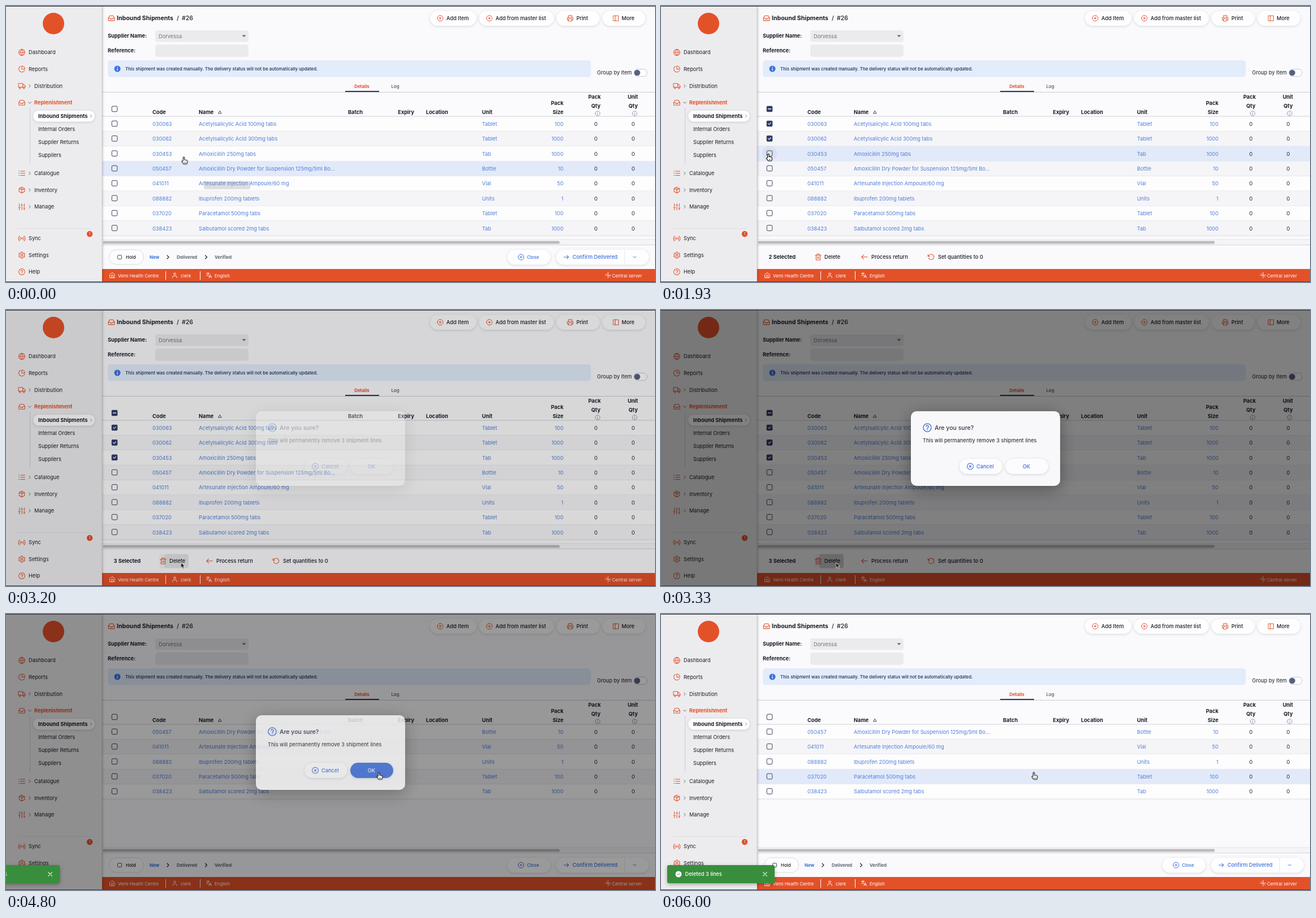
An HTML page that plays this animation: 1148 px wide and 488 px high, repeating every 6070 ms.

```html
<!DOCTYPE html>
<html lang="en">
<head>
<meta charset="utf-8">
<title>Inbound shipment</title>
<style>
  html, body { margin: 0; width: 100%; height: 100%; overflow: hidden; background: #fafafc; }
  svg { display: block; width: 100vw; height: 100vh; font-family: Inter, Roboto, sans-serif; }
  text { white-space: pre; }
  .raised { filter: drop-shadow(0 1px 2px rgba(40, 45, 70, .18)); }
  .card { filter: drop-shadow(0 6px 14px rgba(0, 0, 0, .35)); }
  .toast { filter: drop-shadow(0 2px 3px rgba(0, 0, 0, .3)); }
</style>
</head>
<body>
<svg id="stage" viewBox="0 0 1148 488" preserveAspectRatio="none"></svg>
<script>
const LOOP = 6070;
const CHECKED = [1070, 1500, 2070];
const GONE = 4700;
const ORANGE = '#e35129', INK = '#1c1c28', BLUE = '#3e70dc', LINK = '#527fd6', NAVY = '#323c66', GREY = '#606478';

const ICONS = {
  globe: 'M2 12a10 10 0 1 0 20 0a10 10 0 1 0-20 0h20M12 2c5.4 6 5.4 14 0 20c-5.4-6-5.4-14 0-20',
  pie: 'M21.2 15.9A10 10 0 1 1 8 2.8M22 12A10 10 0 0 0 12 2v10z',
  truck: 'M1 4h14v12H1zM15 8h4l4 4v4h-8M3.5 18.5a2.5 2.5 0 1 0 5 0a2.5 2.5 0 1 0-5 0M16 18.5a2.5 2.5 0 1 0 5 0a2.5 2.5 0 1 0-5 0',
  inbox: 'M22 12h-6l-2 3h-4l-2-3H2M5.5 5L2 12v6a2 2 0 0 0 2 2h16a2 2 0 0 0 2-2v-6l-3.5-7a2 2 0 0 0-1.7-1H7.2a2 2 0 0 0-1.7 1z',
  list: 'M8 5h14M8 12h14M8 19h14M2 5h2M2 12h2M2 19h2',
  box: 'M21 7l-9-5-9 5v10l9 5 9-5zM3 7l9 5 9-5M12 22V12M7.500 4.500l9 5',
  sliders: 'M4 22v-8M4 10V2M12 22V12M12 8V2M20 22v-6M20 12V2M1 14h6M9 8h6M17 16h6',
  radio: 'M16.200 7.800a6 6 0 0 1 0 8.500M7.800 16.200a6 6 0 0 1 0-8.500M19.500 4a11 11 0 0 1 0 16M4.500 20a11 11 0 0 1 0-16M10.500 12a1.500 1.500 0 1 0 3 0a1.500 1.500 0 1 0-3 0',
  gear: 'M9 12a3 3 0 1 0 6 0a3 3 0 1 0-6 0M10 2h4l.6 3 2.400 1.400 3-1 2 3.400-2.300 2v2.400l2.300 2-2 3.400-3-1L14.600 19l-.6 3h-4l-.6-3L7 17.600l-3 1-2-3.400 2.300-2v-2.400L2 8.800l2-3.400 3 1L9.400 5z',
  help: 'M2 12a10 10 0 1 0 20 0a10 10 0 1 0-20 0M9 9a3 3 0 0 1 6 1c0 2-3 2.500-3 4.500M12 17v.5',
  info: 'M2 12a10 10 0 1 0 20 0a10 10 0 1 0-20 0M12 11v6M12 7v.5',
  plus: 'M2 12a10 10 0 1 0 20 0a10 10 0 1 0-20 0M12 8v8M8 12h8',
  cancel: 'M2 12a10 10 0 1 0 20 0a10 10 0 1 0-20 0M9 9l6 6M15 9l-6 6',
  printer: 'M6 9V2h12v7M6 18H2V9h20v9h-4M6 14h12v8H6z',
  panel: 'M3 3h18v18H3zM9 3v18',
  trash: 'M2 6h20M19 6v16H5V6M8 6V2h8v4M10 11v6M14 11v6',
  undo: 'M1 4v6h6M3.500 15a9 9 0 1 0 2-9.400L1 10',
  left: 'M22 12H2M9 5l-7 7 7 7',
  rightArrow: 'M2 12h20M15 5l7 7-7 7',
  home: 'M3 9l9-7 9 7v13H3zM9 22V12h6v10',
  user: 'M20 22v-3a4 4 0 0 0-4-4H8a4 4 0 0 0-4 4v3M8 7a4 4 0 1 0 8 0a4 4 0 1 0-8 0',
  translate: 'M2 5h12M8 2v3M11 5c-1 5-5 8-9 10M5 9c2 3 4 5 7 6M12 22l5-12 5 12M14 18h6',
  hub: 'M12 1v7M12 16v7M1 12h7M16 12h7M5 5l3 3M16 16l3 3M12 10v4M10 12h4',
  right: 'M8 4l8 8-8 8',
  down: 'M4 8l8 8 8-8',
  check: 'M4 12l6 6L20 6',
  close: 'M4 4l16 16M20 4L4 20'
};

const icon = (name, x, y, size, color, weight = 2) =>
  `<path d="${ICONS[name]}" transform="translate(${x - size / 2} ${y - size / 2}) scale(${size / 24})" fill="none" stroke="${color}" stroke-width="${weight}" stroke-linecap="round" stroke-linejoin="round"/>`;
// Text is placed by its vertical centre.
const text = (x, y, str, { color = INK, size = 9.23, weight = 400, anchor = 'start' } = {}) =>
  `<text x="${x}" y="${y + size * .36}" fill="${color}" font-size="${size}" font-weight="${weight}" text-anchor="${anchor}">${str}</text>`;
const rect = (x, y, w, h, fill, extra = '') =>
  `<rect x="${x}" y="${y}" width="${w}" height="${h}" fill="${fill}" ${extra}/>`;
const circle = (x, y, r, fill, extra = '') => `<circle cx="${x}" cy="${y}" r="${r}" fill="${fill}" ${extra}/>`;
const pill = (x, y, w, h, fill = '#fefeff') => rect(x, y, w, h, fill, `rx="${h / 2}" class="raised"`);
// "on" lists the time spans in ms during which the content is visible.
const during = (on, content) => `<g data-on="${on}">${content}</g>`;

const emptyBox = (x, y, size = 9.6) =>
  rect(x - size / 2, y - size / 2, size, size, 'none', 'rx="1.8" stroke="#3f4358" stroke-width="1"');
const fullBox = (x, y, mark) =>
  rect(x - 5.3, y - 5.3, 10.6, 10.6, NAVY, 'rx="1.8"') + icon(mark, x, y, 7, '#fff', 3.5);
const minusBox = (x, y) => rect(x - 5.3, y - 5.3, 10.6, 10.6, NAVY, 'rx="1.8"') + rect(x - 3, y - .7, 6, 1.4, '#fff');

const ROW_H = 26.36, ROW_TOP = 195.3;
const rowY = i => ROW_TOP + ROW_H * (i + .5);
const ITEMS = [
  ['030063', 'Acetylsalicylic Acid 100mg tabs', 'Tablet', 100],
  ['030062', 'Acetylsalicylic Acid 300mg tabs', 'Tablet', 1000],
  ['030453', 'Amoxicillin 250mg tabs', 'Tab', 1000],
  ['050457', 'Amoxicillin Dry Powder for Suspension 125mg/5ml Bo...', 'Bottle', 10],
  ['041011', 'Artesunate Injection Ampoule/60 mg', 'Vial', 50],
  ['088882', 'Ibuprofen 200mg tablets', 'Units', 1],
  ['037020', 'Paracetamol 500mg tabs', 'Tablet', 100],
  ['038423', 'Salbutamol scored 2mg tabs', 'Tab', 1000]
];

function row([code, name, unit, size], i, hovered, checkedAt) {
  const top = ROW_TOP + ROW_H * i, y = top + ROW_H / 2 + .2, link = { color: LINK };
  const box = checkedAt
    ? during(`0-${checkedAt}`, emptyBox(192, y - .7)) + during(`${checkedAt}-${GONE}`, fullBox(192, y - .7, 'check'))
    : emptyBox(192, y - .7);
  return rect(170, top, 978, ROW_H, i % 2 ? '#f5f5f8' : '#fdfdfe')
    + (hovered ? during(hovered, rect(170, top, 978, ROW_H, '#e2eaf9')) : '')
    + rect(170, top + ROW_H - .5, 978, 1, '#d9dbe2') + box
    + text(259, y, code, link) + text(341, y, name, link) + text(842, y, unit, link)
    + text(986, y, size, { color: LINK, anchor: 'end' })
    + text(1043.500, y, 0, { anchor: 'middle' }) + text(1109.500, y, 0, { anchor: 'middle' });
}

function table() {
  const hover = ['420-1270', '260-420 1270-1740', '70-260 1740-2370', '0-70 2370-2440', '2440-2500', '2500-2560', '2560-2610', '2610-2660'];
  const bold = { weight: 700 }, end = { weight: 700, anchor: 'end' };
  return during(`0-${GONE}`, ITEMS.map((item, i) => row(item, i, hover[i], CHECKED[i])).join(''))
    + during(`${GONE}-${LOOP}`, ITEMS.slice(3).map((item, i) => row(item, i, i === 3 && `4950-${LOOP}`)).join(''))
    + rect(170, 152, 978, 43, '#fbfbfd') + rect(170, 152, 978, 1, '#c9cbd3') + rect(170, 194.600, 978, 1, '#cfd1d9')
    + during(`0-${CHECKED[0]} ${GONE}-${LOOP}`, emptyBox(192, 182))
    + during(`${CHECKED[0]}-${GONE}`, minusBox(192, 182))
    + text(259, 187.500, 'Code', bold) + text(341, 187.500, 'Name', bold) + text(605, 187.500, 'Batch', bold)
    + text(722, 187.500, 'Expiry', end) + text(743, 187.500, 'Location', bold) + text(842, 187.500, 'Unit', bold)
    + text(986, 171.500, 'Pack', end) + text(986, 187.500, 'Size', end)
    + text(1052, 161, 'Pack', end) + text(1051.500, 177, 'Qty', end) + text(1118, 161, 'Unit', end) + text(1117.500, 177, 'Qty', end)
    + icon('info', 1046.500, 190, 10, '#70748a', 1.7) + icon('info', 1112, 190, 10, '#70748a', 1.7)
    + `<path d="M375.500 190h5.500l-2.750-4.700z" fill="none" stroke="${INK}" stroke-width=".8"/>`;
}

function sidebar() {
  const entry = (name, y, label, fold) => icon(name, 28, y, 13, ORANGE, 1.9)
    + (fold ? icon(fold, 42, y, 7.5, GREY, 3) : '')
    + text(fold ? 50 : 40, y, label, fold === 'down' ? { color: ORANGE, weight: 700 } : {});
  return rect(0, 0, 169.500, 488, '#ececee', 'style="filter:drop-shadow(1px 0 2px rgba(0,0,0,.3))"')
    + circle(84, 31, 19, ORANGE)
    + entry('globe', 82, 'Dashboard') + entry('pie', 111.500, 'Reports')
    + entry('truck', 141.300, 'Distribution', 'right') + entry('inbox', 171, 'Replenishment', 'down')
    + rect(42, 180, 1, 98, '#cbccd2') + pill(48, 185, 109, 19.500)
    + text(57, 194.800, 'Inbound Shipments', { weight: 700 }) + icon('right', 150.500, 194.800, 7, ORANGE, 3)
    + text(57, 218, 'Internal Orders') + text(57, 241, 'Supplier Returns') + text(57, 264, 'Suppliers')
    + entry('list', 295.800, 'Catalogue', 'right') + entry('box', 325.300, 'Inventory', 'right') + entry('sliders', 355, 'Manage', 'right')
    + rect(20, 393, 130, 1, '#dddde1')
    + entry('radio', 411, 'Sync') + circle(148, 403, 5.200, ORANGE) + text(148, 403, '1', { color: '#fff', size: 6, anchor: 'middle' })
    + entry('gear', 440.500, 'Settings') + entry('help', 470, 'Help');
}

function header() {
  const button = (x, w, name, label) => pill(x, 8.500, w, 26.500)
    + icon(name, x + 18 + (name === 'printer' || name === 'panel' ? 6 : 0), 21.700, 12, ORANGE, 1.9);
  const label = (x, str) => text(x, 21.800, str, { weight: 500 });
  return icon('inbox', 186.500, 21.500, 13, ORANGE) + text(196, 21.500, 'Inbound Shipments', { size: 10.54, weight: 700 })
    + text(302, 21.500, '/', { size: 10.54, weight: 500 }) + text(311, 21.500, '#26', { size: 10.54, weight: 500 })
    + button(750, 82, 'plus') + label(779, 'Add Item') + button(837, 132, 'plus') + label(866, 'Add from master list')
    + button(974, 76, 'printer') + label(1009, 'Print') + button(1055, 76, 'panel') + label(1089, 'More')
    + text(180, 52.500, 'Supplier Name:', { weight: 700 }) + text(180, 79, 'Reference:', { weight: 700 })
    + rect(264, 43, 165, 20.500, '#ebebee', 'rx="4"') + text(270, 54, 'Dorvessa', { color: '#72747f' })
    + '<path d="M417.500 51.500h7l-3.500 3.500z" fill="#666"/>' + rect(264, 68, 165, 22, '#ebebee', 'rx="5"')
    + rect(180, 96, 854.500, 29.500, '#e2ecfb', 'rx="5"') + circle(197, 111, 5.500, BLUE)
    + rect(196.400, 110, 1.300, 4, '#fff') + rect(196.400, 107.600, 1.300, 1.400, '#fff')
    + text(211, 111, 'This shipment was created manually. The delivery status will not be automatically updated.', { size: 7.85, weight: 500, color: '#202a4a' })
    + text(1045.500, 118, 'Group by Item')
    + rect(1111, 111.500, 23, 13, '#fff', 'rx="6.500" stroke="#c3c5cf"') + circle(1116.500, 118, 5.300, '#59617f')
    + text(629.500, 142.500, 'Details', { color: ORANGE, size: 7.9, weight: 700, anchor: 'middle' })
    + text(688.500, 142.500, 'Log', { color: GREY, size: 7.9, weight: 600, anchor: 'middle' });
}

function footer() {
  const step = (x, str, color) => text(x, 444, str, { color, size: 7.8, weight: 700 });
  const action = (name, x, tx, str) => icon(name, x, 443.800, 12.500, ORANGE) + text(tx, 444, str, { weight: 500 });
  const tag = (name, x, tx, str) => icon(name, x, 476, 11, '#fff', 1.9) + text(tx, 476.700, str, { color: '#fff', size: 7.9 });
  return rect(170, 412.500, 978, 1, '#dfe0e5') + rect(170, 413.500, 978, 9, '#f5f5f7') + rect(171.500, 415.600, 808, 5, '#bcbcbf', 'rx="2.500"')
    + rect(170, 422, 978, 43, '#fafafc') + rect(170, 422, 978, 1, '#d3d5dc')
    + during(`0-${CHECKED[0]} ${GONE}-${LOOP}`,
      rect(182.500, 431, 61, 26, '#fdfdfe', 'rx="13" stroke="#d9dae0"') + emptyBox(201, 444, 7) + text(212, 444, 'Hold', { size: 7.9, weight: 500 })
      + step(254, 'New', BLUE) + icon('right', 286.500, 444, 9, INK, 3) + step(302, 'Delivered', GREY) + icon('right', 354, 444, 9, INK, 3) + step(369, 'Verified', GREY)
      + pill(887, 431, 76, 26.500) + icon('cancel', 911, 444, 12, BLUE) + text(921.500, 444.200, 'Close', { color: BLUE, size: 7.9, weight: 500 })
      + pill(973, 431, 164, 26.500) + rect(1094, 431, 1, 26.500, '#e8e9ee') + icon('rightArrow', 991, 444, 10, BLUE, 2.5)
      + text(1002, 444, 'Confirm Delivered', { color: BLUE, weight: 500 }) + icon('down', 1112, 444, 8, BLUE, 3))
    + during(`${CHECKED[0]}-${GONE}`,
      CHECKED.map((t, i) => during(`${t}-${CHECKED[i + 1] || GONE}`, text(190.500, 444, `${i + 1} Selected`, { weight: 700 }))).join('')
      + during('2830-4000', rect(271, 431.500, 52, 25, '#000', 'rx="4" opacity=".03"'))
      + rect(280, 431.500, 43, 25, '#000', 'rx="4" id="press"')
      + action('trash', 278, 289, 'Delete') + action('left', 360, 372, 'Process return') + action('undo', 478, 490, 'Set quantities to 0'))
    + rect(170, 465, 978, 23, ORANGE) + rect(282, 469, 1, 15, '#fff') + rect(343, 469, 1, 15, '#fff')
    + tag('home', 188, 198, 'Vemi Health Centre') + tag('user', 298.500, 309, 'clerk') + tag('translate', 359, 369, 'English') + tag('hub', 1065, 1072, 'Central server');
}

const dialog = () => `<g id="dialog">${rect(442, 179, 264, 132, '#fafafc', 'rx="10" class="card"')}`
  + icon('help', 471, 208, 17, BLUE, 1.9) + text(484, 208, 'Are you sure?', { size: 10.54, weight: 500, color: '#33374c' })
  + text(463, 230.500, 'This will permanently remove 3 shipment lines')
  + pill(528, 263, 75.500, 27) + icon('cancel', 547, 276.500, 13, BLUE) + text(558, 276.500, 'Cancel', { color: BLUE, weight: 500 })
  + pill(609, 263, 76, 27) + text(646.500, 276.500, 'OK', { color: BLUE, weight: 500, anchor: 'middle' })
  + during('3930-5100', rect(609, 263, 76, 27, BLUE, 'rx="13.500"') + text(646.500, 276.500, 'OK', { color: '#fff', weight: 500, anchor: 'middle' })) + '</g>';

const toast = () => `<g id="toast">${rect(11, 444, 190, 32, '#388e3c', 'rx="3" class="toast"')}`
  + circle(31, 460, 5.500, '#fff') + icon('check', 31, 460, 6, '#388e3c', 4)
  + text(42.500, 460, 'Deleted 3 lines', { color: '#fff', weight: 500 }) + icon('close', 184, 460, 10, '#fff', 2.6) + '</g>';

const halos = () => ['640-1170', '1380-1680', '1830-2320'].map((on, i) => during(on, circle(192, rowY(i) - .5, 13, NAVY, 'opacity=".05"'))
  + circle(192, rowY(i) - .5, 13, NAVY, `class="ripple" data-at="${CHECKED[i] - 90}"`)).join('');

const pointer = () => '<g id="pointer" stroke-linejoin="round">'
  + during(`0-2700 3930-${LOOP}`, '<path d="M-1.200 6V.8a1.200 1.200 0 0 1 2.400 0V4.500l4 .8q1.500.4 1.300 2l-.6 3q-.2 1.200-1 1.700H.2q-2.700-2.600-3.700-4.600.2-1.500 1.500-.8z" fill="#fff" stroke="#111" stroke-width="1.100"/><path d="M1.500 8.500v2.200M3.300 8.500v2.200" stroke="#111" stroke-width=".7"/>')
  + during('2700-3930', '<path d="M0 0v9.500l2.200-2 1.600 3.700 1.800-.8-1.600-3.600h3z" fill="#111" stroke="#fff" stroke-width=".8"/>') + '</g>';

const stage = document.getElementById('stage');
stage.innerHTML = rect(0, 0, 1148, 488, '#fafafc') + header() + table() + rect(600, 150, 60, 2, NAVY) + halos()
  + rect(350, 310, 82, 14, '#70747c', 'rx="2" id="tip"') + footer() + sidebar()
  + rect(0, 0, 1148, 488, '#000', 'id="veil"') + dialog() + toast() + pointer()
  + rect(0, 0, 1148, 1, '#34343a') + rect(0, 487, 1148, 1, '#4a4244');

const sheet = document.head.appendChild(document.createElement('style'));
let count = 0, css = '';
function animate(el, frames, easing = 'linear') {
  const name = `k${count++}`;
  css += `@keyframes ${name}{${frames.map(([ms, rule]) => `${(ms / LOOP * 100).toFixed(4)}%{${rule}}`).join('')}}\n`;
  el.style.animation = `${name} ${LOOP}ms ${easing} infinite`;
}
const byId = id => document.getElementById(id);
const fade = (el, points, easing) => animate(el, points.map(([ms, o]) => [ms, `opacity:${o}`]), easing);

for (const el of stage.querySelectorAll('[data-on]')) {
  const points = new Map([[0, 0]]);
  for (const span of el.dataset.on.split(' ')) {
    const [from, to] = span.split('-').map(Number);
    points.set(from, 1);
    points.set(to, 0);
  }
  fade(el, [...points].sort((a, b) => a[0] - b[0]), 'step-end');
}
for (const el of stage.querySelectorAll('.ripple')) {
  const at = +el.dataset.at;
  fade(el, [[0, 0], [at, 0], [at + 100, .14], [at + 380, 0], [LOOP, 0]]);
}

const STANDARD = 'cubic-bezier(.4,0,.2,1)';
fade(byId('veil'), [[0, 0], [3140, 0], [3365, .5], [4755, .5], [4950, 0], [LOOP, 0]], STANDARD);
fade(byId('dialog'), [[0, 0], [3140, 0], [3365, 1], [4755, 1], [4950, 0], [LOOP, 0]], STANDARD);
fade(byId('tip'), [[0, .22], [70, .18], [220, 0], [LOOP, 0]]);
fade(byId('press'), [[0, 0], [3100, 0], [3330, .14], [4650, .14], [4700, 0], [LOOP, 0]]);
animate(byId('toast'), [[0, -215], [4755, -215], [4980, 0], [LOOP, 0]]
  .map(([ms, x]) => [ms, `transform:translateX(${x}px)`]), 'cubic-bezier(0,0,.2,1)');
animate(byId('pointer'), [
  [0, 314.5, 267.5], [70, 314.5, 267], [640, 193, 209.5], [1130, 193, 209.5], [1400, 192, 236],
  [1620, 192, 236], [1870, 190, 262], [2270, 190, 262], [2870, 309.5, 446.5],
  [3400, 309.5, 446.5], [4050, 659.5, 280.5], [LOOP, 659.5, 280.5]
].map(([ms, x, y]) => [ms, `transform:translate(${x}px,${y}px)`]), 'ease-in-out');
sheet.textContent = css;
</script>
</body>
</html>
```
